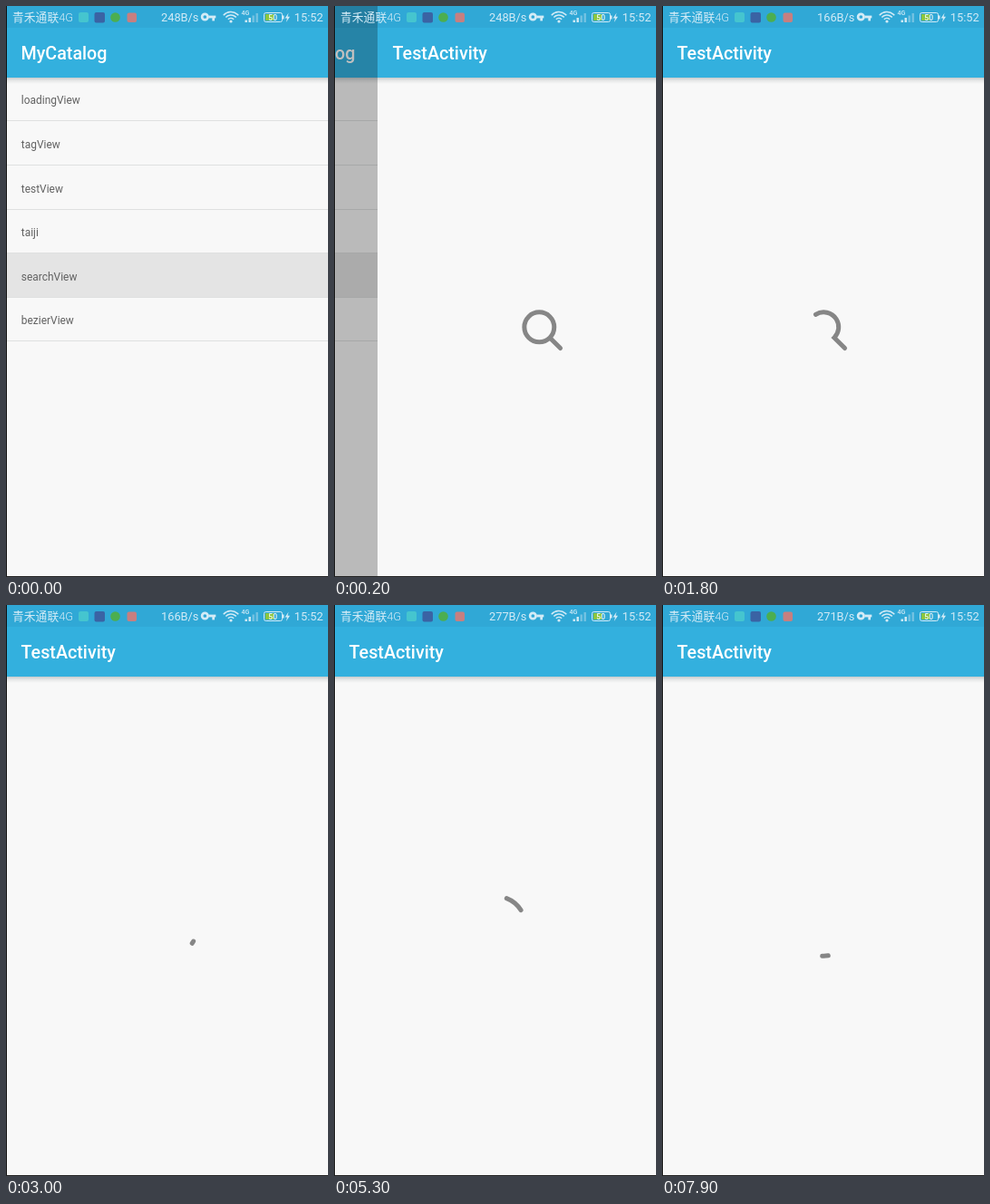
An HTML page with a canvas that plays this animation: 355x630 px, repeating every 8000 ms.

```html
<!DOCTYPE html>
<html lang="en">
<head>
<meta charset="utf-8">
<title>Search view</title>
<style>
html, body { margin: 0; width: 100%; height: 100%; overflow: hidden; background: #f8f8f8; }
canvas { display: block; width: 355px; height: 630px; }
</style>
</head>
<body>
<canvas id="stage"></canvas>
<script>
const W = 355, H = 630, LOOP = 8000, STEP = 100;
const ROWS = ['loadingView', 'tagView', 'testView', 'taiji', 'searchView', 'bezierView'];
const PRESSED = 4;
const SLIDE = [355, 141, 48, 10, 0];   // page offset at each step
const CX = 178.3, CY = 354.3, SMALL = 16.45, BIG = 32.9;
const START = 926, SPIN = 1838, TAIL = 65.8;
const SANS = 'Roboto, "Noto Sans CJK SC", "Noto Sans CJK", sans-serif';

const canvas = document.getElementById('stage');
const ctx = canvas.getContext('2d');
const dpr = window.devicePixelRatio || 1;
canvas.width = W * dpr;
canvas.height = H * dpr;

const ease = t => 0.5 - 0.5 * Math.cos(Math.PI * t);

function rect(x, y, w, h, color) {
  ctx.fillStyle = color;
  ctx.fillRect(x, y, w, h);
}

function text(str, x, y, font, color) {
  ctx.font = font + ' ' + SANS;
  ctx.fillStyle = color;
  ctx.fillText(str, x, y);
}

function disc(x, y, r, color) {
  ctx.fillStyle = color;
  ctx.beginPath();
  ctx.arc(x, y, r, 0, 2 * Math.PI);
  ctx.fill();
}

function tile(x, y, size, color) {
  ctx.fillStyle = color;
  ctx.beginPath();
  ctx.roundRect(x, y, size, size, 2);
  ctx.fill();
}

function page(title) {
  rect(0, 0, W, H, '#f8f8f8');
  const shade = ctx.createLinearGradient(0, 79, 0, 86);
  shade.addColorStop(0, '#c6cbcd');
  shade.addColorStop(0.45, '#e6e7e7');
  shade.addColorStop(1, '#f8f8f8');
  rect(0, 79, W, 7, shade);
  rect(0, 0, W, 79, '#33b0de');
  rect(0, 0, W, 24, '#30a8d6');
  text(title, 16.5, 59, '500 19.7px', '#fff');
}

function listPage() {
  page('MyCatalog');
  ROWS.forEach((name, i) => {
    const bottom = Math.round(126.4 + i * 48.55);
    if (i === PRESSED) rect(0, bottom - 48, W, 48, '#e4e4e4');
    rect(0, bottom, W, 1, '#dfe0e0');
    text(name, 16.8, bottom - 18.5, '400 11.95px', '#616161');
  });
}

// Magnifier with the first `cut` part of its outline removed
function magnifier(cut) {
  const arcLen = 2 * Math.PI * SMALL, handle = BIG - SMALL;
  const from = cut * (arcLen + handle);
  const a0 = Math.PI / 4, c = Math.SQRT1_2;
  ctx.beginPath();
  if (from < arcLen) ctx.arc(CX, CY, SMALL, a0 + from / SMALL, a0 + 2 * Math.PI - 0.0017);
  const r = SMALL + Math.max(0, from - arcLen);
  ctx.lineTo(CX + r * c, CY + r * c);
  ctx.lineTo(CX + BIG * c, CY + BIG * c);
  ctx.stroke();
}

// Arc running counterclockwise, longest halfway round
function spinner(v) {
  const head = 2 * Math.PI * v;
  const tail = (0.5 - Math.abs(v - 0.5)) * TAIL / BIG;
  const a = Math.PI / 4 - head;
  ctx.beginPath();
  ctx.arc(CX, CY, BIG, a, a + Math.max(tail, 0.002));
  ctx.stroke();
}

function searchPage(t) {
  page('TestActivity');
  ctx.strokeStyle = '#868686';
  ctx.lineWidth = 5;
  ctx.lineCap = 'round';
  ctx.lineJoin = 'miter';
  const turns = (t - START) / SPIN;
  if (turns < 1) magnifier(ease(Math.max(0, turns)));
  else spinner(ease(turns % 1));
}

function wifi(x, y, color) {
  ctx.strokeStyle = color;
  ctx.lineWidth = 1.5;
  ctx.lineCap = 'butt';
  for (const r of [4.2, 7.6, 11]) {
    ctx.beginPath();
    ctx.arc(x, y, r, -Math.PI * 0.77, -Math.PI * 0.23);
    ctx.stroke();
  }
  disc(x, y - 0.6, 1.6, color);
}

function key(x, y, color) {
  ctx.strokeStyle = color;
  ctx.lineWidth = 2.7;
  ctx.beginPath();
  ctx.arc(x, y, 3.2, 0, 2 * Math.PI);
  ctx.stroke();
  rect(x + 4, y - 1.4, 8, 2.8, color);
  rect(x + 8, y, 2.7, 4.4, color);
}

function battery(color) {
  ctx.strokeStyle = color;
  ctx.lineWidth = 1;
  ctx.beginPath();
  ctx.roundRect(284.5, 7.5, 20, 10, 2);
  ctx.stroke();
  rect(305, 10.5, 1.5, 4, color);
  rect(286, 9, 9, 7, '#8cc63f');
  text('50', 289.3, 15.8, '500 8.5px', '#f2f8f4');
  ctx.fillStyle = color;
  ctx.beginPath();
  ctx.moveTo(311.6, 7.5);
  ctx.lineTo(307.6, 13.4);
  ctx.lineTo(310, 13.4);
  ctx.lineTo(308.8, 18);
  ctx.lineTo(313, 11.8);
  ctx.lineTo(310.5, 11.8);
  ctx.fill();
}

function statusBar(t) {
  const ink = '#d3ebf6', font = '400 12.8px';
  const rate = t < 1400 ? 248 : t < 4100 ? 166 : t < 6900 ? 277 : 271;
  text('青禾通联4G', 7, 17.3, '300 12.8px', ink);
  tile(80, 7, 11, '#45c5cf');
  tile(97.5, 7, 11.5, '#3a63a4');
  disc(120.5, 12.5, 5.3, '#4cae50');
  tile(133.5, 7.5, 10.5, '#c67f80');
  text(rate + 'B/s', 171, 17.2, font, ink);
  key(219.3, 12, ink);
  wifi(248, 17.6, ink);
  text('4G', 259.5, 9.6, '500 7px', ink);
  [2.5, 5, 7.5, 10].forEach((h, i) => {
    rect(263.5 + i * 4, 18 - h, 2.4, h, i < 2 ? ink : '#74c2e2');
  });
  battery(ink);
  text('15:52', 317.8, 17.2, font, ink);
}

function draw(t) {
  const offset = SLIDE[Math.min(t / STEP, SLIDE.length - 1)];
  const shown = 1 - offset / W;
  ctx.setTransform(dpr, 0, 0, dpr, 0, 0);
  if (offset > 0) {
    ctx.save();
    ctx.translate(Math.round(-102 * shown), 0);
    listPage();
    ctx.restore();
    rect(0, 0, W, H, `rgba(0,0,0,${0.29 * shown})`);
  }
  ctx.save();
  ctx.translate(offset, 0);
  searchPage(t);
  ctx.restore();
  statusBar(t);
  rect(0, 0, 1, H, '#111');
  rect(0, H - 1, W, 1, '#222');
}

const began = performance.now();
function tick() {
  const t = (performance.now() - began) % LOOP;
  draw(Math.floor(t / STEP) * STEP);
  requestAnimationFrame(tick);
}
tick();
</script>
</body>
</html>
```
